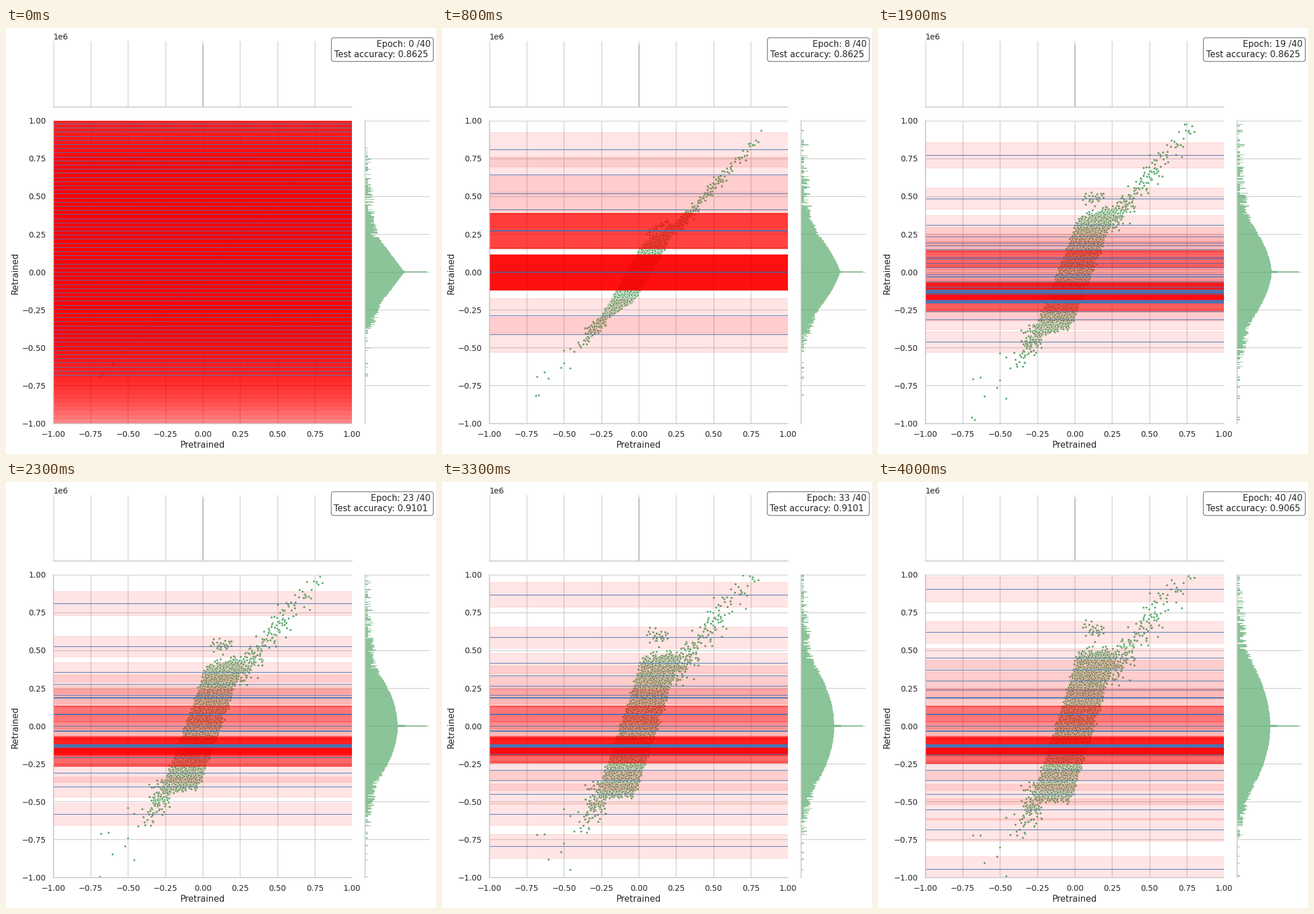
These frames come from a looping animation (752x744 px, 4100 ms). A matplotlib script:

```python
import numpy as np
import matplotlib.pyplot as plt
from matplotlib.animation import FuncAnimation
from matplotlib.collections import LineCollection, PolyCollection

W, H, DPI = 752, 744, 100
EPOCHS = 40
INK, GRID, GREEN, BLUE = "#262626", "#cccccc", "#55a868", "#4c72b0"
TICK_PT, LABEL_PT = 10, 10.9
TICKS = np.linspace(-1, 1, 9)

plt.rcParams["font.family"] = "DejaVu Sans"
plt.rcParams["text.color"] = INK

KEYS = [0, 5, 8, 14, 23, 33, 40]

# Histogram envelope at the key epochs: peak - slope * |y| ** power
PEAK = [64, 64, 63, 60, 52, 53, 53]
SLOPE = [200, 240, 236, 190, 275, 215, 185]
POWER = [1, 1.28, 1.33, 1.27, 2, 2, 2]
GROWTH = [0, .22, .33, .6, .8, .92, 1]

EDGES = np.linspace(-1.0025, 1.0025, 402)
MIDS = (EDGES[:-1] + EDGES[1:]) / 2
rng = np.random.default_rng(7)
BIN_NOISE = rng.normal(size=MIDS.size)


def bands(base, slope, single, *stacks):
    """Rows of centre and half width; a stack is (first, last, count)."""
    mid = np.concatenate([single] + [np.linspace(*s) for s in stacks])
    mid = np.sort(mid)[::-1]
    return np.column_stack([mid, base + slope * np.abs(mid)])


def late_bands(drop, low, edge):
    high = np.array([.903, .62, .45, .37, .30, .24]) - drop
    rows = bands(.05, .037, np.concatenate([high[high > .19], low]),
                 (.19, .187, 2), (.08, .078, 7), (-.03, -.035, 3),
                 (-.12, -.14, 18), (edge, edge, 8))
    rows = np.vstack([rows, [0, .02], [0, .02]])
    return rows[np.argsort(-rows[:, 0])]


BAND_ROWS = [
    bands(.45, 0, [], (.98, -.68, 62)),
    bands(.187, 0, [.80, .64, .49, .272, -.175, -.48, -.575],
          (.755, .72, 4), (.60, .52, 7), (.006, -.01, 24)),
    bands(.115, 0, [.81, .645, .52, .412, -.288, -.413],
          (.275, .271, 12), (0, 0, 24)),
    bands(.05, .055, [.725, .433, .25, -.31],
          (.18, .16, 3), (.10, .097, 10), (-.005, -.045, 5),
          (-.11, -.14, 18), (-.2, -.165, 10)),
    late_bands(.094, [-.31, -.402, -.582], -.207),
    late_bands(.035, [-.29, -.36, -.448, -.582, -.795], -.184),
    late_bands(0, [-.29, -.36, -.45, -.55, -.685, -.945], -.19),
]


def bands_at(epoch):
    """Blend the sorted bands of the two neighbouring key epochs."""
    k = min(np.searchsorted(KEYS, epoch, side="right"), len(KEYS) - 1)
    part = (epoch - KEYS[k - 1]) / (KEYS[k] - KEYS[k - 1])
    a, b = BAND_ROWS[k - 1], BAND_ROWS[k]
    q = np.linspace(0, 1, round(len(a) + (len(b) - len(a)) * part))

    def pick(rows, col):
        return np.interp(q, np.linspace(0, 1, len(rows)), rows[:, col])

    return [(1 - part) * pick(a, c) + part * pick(b, c) for c in (0, 1)]


def make_core(n=5600):
    u = rng.uniform(-1, 1, n) + rng.normal(0, .045, n)
    v = rng.uniform(-1, 1, n) + rng.normal(0, .07, n)
    return .15 * u + .12 * v, .48 * u


def make_tails():
    up = .25 + rng.exponential(.19, 230)
    up = np.append(up[up < .8], [.76, .8, .82])
    down = -.22 - rng.exponential(.075, 170)
    down = down[down > -.46]
    knot = rng.normal(.125, .045, 30)
    far = np.array([(-.68, -.72), (-.63, -.72), (-.605, -.905), (-.69, -1.07),
                    (-.67, -1.1), (-.52, -.86), (-.5, -.8), (-.5, -.55),
                    (-.46, -.99)])
    x = np.concatenate([up, down, knot, far[:, 0]])
    y = np.concatenate([1.3 * up + .04 + rng.normal(0, .065, up.size),
                        1.1 * down - .2 + rng.normal(0, .075, down.size),
                        rng.normal(.63, .03, knot.size), far[:, 1]])
    return x, y


CORE_X, CORE_Y = make_core()
TAIL_X, TAIL_Y = make_tails()
ALL_X = np.concatenate([CORE_X, TAIL_X])


def bar_lengths(epoch, tail_y):
    peak, slope, power = (np.interp(epoch, KEYS, s) for s in (PEAK, SLOPE, POWER))
    mean = 10 ** ((peak - slope * np.abs(MIDS) ** power) / 16)
    count = np.rint(mean + BIN_NOISE * np.sqrt(mean)).clip(0)
    count += np.histogram(tail_y, EDGES)[0]
    size = np.where(count >= 1, 5 + 16 * np.log10(np.maximum(count, 1)), 0)
    mid = MIDS.size // 2
    size[mid - 1:mid + 2] = np.maximum(size[mid - 1:mid + 2], 70)
    size[mid] = 108
    return size


def accuracy(epoch):
    if epoch < 20:
        return .8625
    if epoch < 35:
        return .9101
    return .9083 if epoch < EPOCHS else .9065


fig = plt.figure(figsize=(W / DPI, H / DPI), dpi=DPI, facecolor="white")


def panel(x0, y0, x1, y1, spines):
    ax = fig.add_axes([x0 / W, 1 - y1 / H, (x1 - x0) / W, (y1 - y0) / H])
    ax.set_axisbelow(True)
    for side, spine in ax.spines.items():
        spine.set_visible(side in spines)
        spine.set(color=GRID, linewidth=1.25)
    ax.tick_params(length=0, pad=9, labelsize=TICK_PT, labelcolor=INK)
    return ax


def note(x, y, s, size, **kw):
    return fig.text(x / W, 1 - y / H, s, fontsize=size, **kw)


joint = panel(82.6, 161.7, 605.3, 690.6, ("left", "bottom"))
joint.set(xlim=(-1, 1), ylim=(-1, 1), xticks=TICKS, yticks=TICKS)
names = [f"{v:.2f}".replace("-", "\u2212") for v in TICKS]
joint.set_xticklabels(names)
joint.set_yticklabels(names)
joint.grid(color=GRID, linewidth=.9)
joint.xaxis.get_major_ticks()[-1].gridline.set_visible(False)

top = panel(82.6, 23, 605.3, 137.6, ("bottom",))
top.set(xlim=(-1, 1), ylim=(0, 1.05), xticks=TICKS[:-1], yticks=[])
top.set_xticklabels([])
top.grid(axis="x", color=GRID, linewidth=.9)
top.plot([0, 0], [0, 1], color="#a0a0a0", linewidth=1, solid_capstyle="butt")

side = panel(628, 161.7, 741.4, 690.6, ("left",))
side.set(xlim=(0, 113.4), ylim=(-1, 1), xticks=[], yticks=TICKS[1:])
side.set_yticklabels([])
side.grid(axis="y", color=GRID, linewidth=.9)

note(82.5, 20, "1e6", TICK_PT, va="baseline")
note(344, 733, "Pretrained", LABEL_PT, ha="center", va="baseline")
note(21, 428, "Retrained", LABEL_PT, ha="center", va="baseline",
     rotation=90, rotation_mode="anchor")
info = note(742.8, 21.5, "", LABEL_PT, ha="right", va="top",
            bbox=dict(boxstyle="round,pad=0.3", facecolor="white",
                      edgecolor="black", alpha=.5, linewidth=1))

dots = joint.scatter(ALL_X, ALL_X, s=8, color=GREEN, edgecolor="white",
                     linewidth=.45, zorder=1)
spans = PolyCollection([], facecolor=(1, 0, 0, .1), edgecolor=(1, 0, 0, .1),
                       linewidth=1, zorder=1.5)
centres = LineCollection([], color=BLUE, linewidth=.75, zorder=2)
joint.add_collection(spans, autolim=False)
joint.add_collection(centres, autolim=False)
bars = side.stairs(np.zeros(MIDS.size), EDGES, orientation="horizontal",
                   fill=True, color=GREEN, alpha=.68, linewidth=0)
side.set(xlim=(0, 113.4), ylim=(-1, 1))


def draw(epoch):
    grow = np.interp(epoch, KEYS, GROWTH)
    core_y = CORE_X + (CORE_Y - CORE_X) * grow
    tail_y = TAIL_X + (TAIL_Y - TAIL_X) * grow
    dots.set_offsets(np.column_stack([ALL_X, np.concatenate([core_y, tail_y])]))

    mid, half = bands_at(epoch)
    spans.set_verts([[(-1.1, m - h), (1.1, m - h), (1.1, m + h), (-1.1, m + h)]
                     for m, h in zip(mid, half)])
    centres.set_segments([[(-1.1, m), (1.1, m)] for m in mid])

    bars.set_data(bar_lengths(epoch, tail_y))
    info.set_text(f"Epoch: {epoch} /{EPOCHS}\nTest accuracy: {accuracy(epoch):.4f} ")
    return dots, spans, centres, bars, info


anim = FuncAnimation(fig, draw, frames=EPOCHS + 1, interval=100, repeat=True)
plt.show()
```
